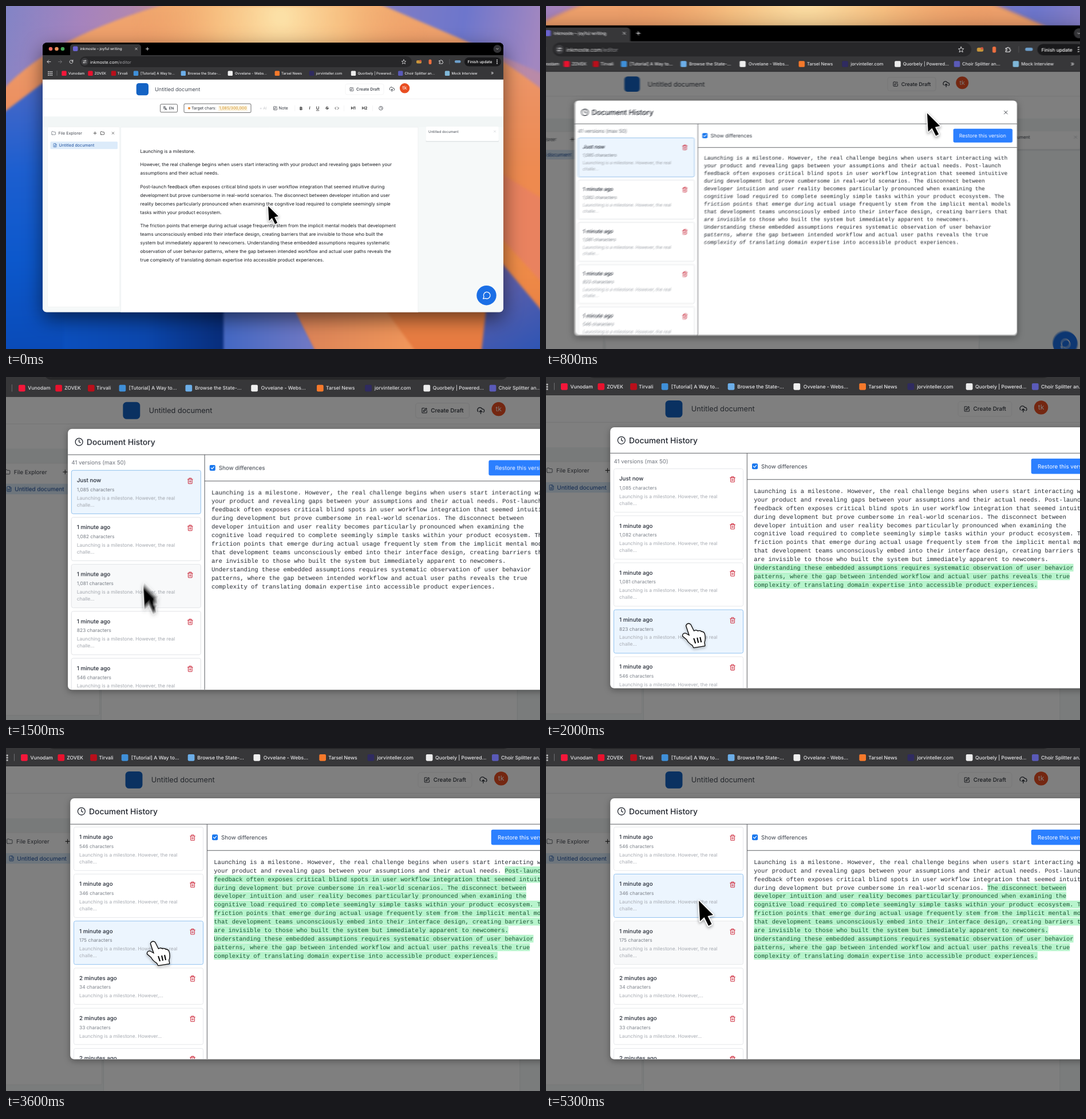
These frames come from a looping animation (933x600 px, 5400 ms). An HTML page with a canvas:

```html
<!DOCTYPE html>
<html lang="en">
<head>
<meta charset="utf-8">
<title>Document history</title>
<style>
html, body { margin: 0; width: 100%; height: 100%; overflow: hidden; background: #000 }
canvas { display: block; width: 933px; height: 600px }
</style>
</head>
<body>
<canvas id="stage" width="933" height="600"></canvas>
<script>
const W = 933, H = 600, LOOP = 5400, STEP = 100, ZOOM = 1.4;
const newCanvas = () => Object.assign(document.createElement('canvas'), { width: W, height: H });
const out = document.getElementById('stage').getContext('2d');
const layer = newCanvas(), wallpaper = newCanvas();
let c = layer.getContext('2d');

const PARAGRAPHS = [
  'Launching is a milestone.',
  'However, the real challenge begins when users start interacting with your product and revealing gaps between your\nassumptions and their actual needs.',
  'Post-launch feedback often exposes critical blind spots in user workflow integration that seemed intuitive during\ndevelopment but prove cumbersome in real-world scenarios. The disconnect between developer intuition and user\nreality becomes particularly pronounced when examining the cognitive load required to complete seemingly simple\ntasks within your product ecosystem.',
  'The friction points that emerge during actual usage frequently stem from the implicit mental models that development\nteams unconsciously embed into their interface design, creating barriers that are invisible to those who built the\nsystem but immediately apparent to newcomers. Understanding these embedded assumptions requires systematic\nobservation of user behavior patterns, where the gap between intended workflow and actual user paths reveals the\ntrue complexity of translating domain expertise into accessible product experiences.'
];
const FULL = PARAGRAPHS.join(' ').replace(/\n/g, ' ');
const MONO_LINES = FULL.match(/.{1,95}(?: |$)/g);

const ICON = {
  clock: 'M12 6v6l4 2M22 12a10 10 0 1 1-20 0a10 10 0 1 1 20 0',
  file: 'M15 2H6a2 2 0 0 0-2 2v16a2 2 0 0 0 2 2h12a2 2 0 0 0 2-2V7zM14 2v6h6M8 13h8M8 17h8',
  folder: 'M4 20h16a2 2 0 0 0 2-2V8a2 2 0 0 0-2-2h-8l-2-3H4a2 2 0 0 0-2 2v13a2 2 0 0 0 2 2z',
  trash: 'M3 6h18M5 6v14a2 2 0 0 0 2 2h10a2 2 0 0 0 2-2V6M8 6V2h8v4M10 11v6M14 11v6',
  edit: 'M12 3H5a2 2 0 0 0-2 2v14a2 2 0 0 0 2 2h14a2 2 0 0 0 2-2v-7M18 3l3 3l-9 9l-4 1l1-4z',
  cloud: 'M4 15a7 7 0 1 1 12-7h2a5 5 0 0 1 2 9M12 12v9M8 16l4-4l4 4',
  cross: 'M5 5l14 14M19 5l-14 14',
  plus: 'M4 12h16M12 4v16',
  back: 'M21 12H3M11 4l-8 8l8 8',
  next: 'M3 12h18M13 4l8 8l-8 8',
  reload: 'M20 12a8 8 0 1 1-3-6l3 3M20 3v6h-6',
  star: 'M12 2l3 7l7 .5l-5.500 5l2 7.500l-6.500-4l-6.500 4l2-7.500l-5.500-5l7-.5z',
  puzzle: 'M4 7h5a3 3 0 1 1 6 0h4v5a3 3 0 1 1 0 6v3H4v-5a3 3 0 1 0 0-5z',
  bubble: 'M3 21l2-5a9 9 0 1 1 4 4z',
  down: 'M5 9l7 7l7-7',
  code: 'M8 6l-6 6l6 6M16 6l6 6l-6 6',
  tune: 'M3 7h8M19 7h2M15 4a3 3 0 1 1 0 6a3 3 0 1 1 0-6M13 17h8M3 17h2M8 14a3 3 0 1 1 0 6a3 3 0 1 1 0-6',
  translate: 'M2 5h12M8 2v3M12 5c-1 5-5 9-9 10M4 8c2 4 5 6 8 7M11 22l5-12l5 12M13 18h6',
  check: 'M4 12l6 6l10-12'
};
for (const k in ICON) ICON[k] = new Path2D(ICON[k]);
const ARROW = new Path2D('M0 0L2 36L9.500 29L17 44L22.500 41L15.500 27L25 25Z');
const HAND = new Path2D('M-4 2Q-2-3 3 0L9 12Q13 9 16 12Q20 10 22 13Q27 12 28 19Q29 27 27 31L28 37L9 40L7 36Q0 32-3 26L-10 20Q-10 15-5 16L2 20Z');
const FINGERS = new Path2D('M9 24l3 9M15 23l2 9M20 22l2 9');

// ---- drawing helpers ----
function box(x, y, w, h, fill, r = 0, stroke) {
  c.beginPath();
  c.roundRect(x, y, w, h, r);
  if (fill) { c.fillStyle = fill; c.fill(); }
  if (stroke) { c.strokeStyle = stroke; c.stroke(); }
}
function dot(x, y, r, fill) {
  c.beginPath();
  c.arc(x, y, r, 0, 7);
  c.fillStyle = fill;
  c.fill();
}
// y is the middle of the capitals
function text(str, x, y, size, fill, weight = 400, family = 'Inter, sans-serif') {
  c.font = `${weight} ${size}px ${family}`;
  c.fillStyle = fill;
  c.fillText(str, x, y + size * 0.36);
}
function centered(...args) {
  c.textAlign = 'center';
  text(...args);
  c.textAlign = 'left';
}
function icon(name, x, y, size, color, width = 2) {
  c.save();
  c.translate(x - size / 2, y - size / 2);
  c.scale(size / 24, size / 24);
  c.lineWidth = width;
  c.lineJoin = c.lineCap = 'round';
  c.strokeStyle = color;
  c.stroke(ICON[name]);
  c.restore();
}
function shape(path, fill) {
  c.fillStyle = fill;
  c.fill(new Path2D(path));
}
function ramp(x0, y0, x1, y1, ...colors) {
  const g = c.createLinearGradient(x0, y0, x1, y1);
  colors.forEach((col, i) => g.addColorStop(i / (colors.length - 1), col));
  return g;
}

// ---- timing ----
const clamp = x => Math.max(0, Math.min(1, x));
const smooth = x => (x = clamp(x), x * x * (3 - 2 * x));
function spring(ms) {
  const u = Math.max(0, ms) * 0.0105;
  return 1 - (1 + u) * Math.exp(-u);
}
function camera(t) {
  const zoom = spring(t - 590), pan = spring(t - 1005);
  return {
    s: 1 + (ZOOM - 1) * zoom,
    x: 466.5 + 35.5 * zoom - 90.1 * pan,
    y: 300 - 38 * zoom + 58 * pan
  };
}
const MOUSE = [[0, 458, 350], [100, 458, 350], [600, 648, 186], [800, 648, 186],
  [1100, 547, 233.5], [1500, 253, 365], [1900, 256, 415], [2200, 258, 415], [2650, 260, 377],
  [3100, 260, 377], [3500, 262.3, 348.6], [4600, 262.3, 348.6], [5000, 268, 286], [5300, 269.4, 296.5], [5500, 269.4, 296.5]];
function mouse(t) {
  t = Math.max(0, t);
  const i = Math.max(1, MOUSE.findIndex(k => k[0] > t)) - 1;
  const a = MOUSE[i], b = MOUSE[i + 1], dt = b[0] - a[0], u = (t - a[0]) / dt;
  const slope = (k, n) => {
    const p = MOUSE[k - 1], q = MOUSE[k], r = MOUSE[k + 1];
    if (!p || !r || (q[n] - p[n]) * (r[n] - q[n]) <= 0) return 0;
    return (r[n] - p[n]) / (r[0] - p[0]);
  };
  return [1, 2].map(n => a[n] + (b[n] - a[n]) * u * u * (3 - 2 * u)
    + dt * u * (1 - u) * ((1 - u) * slope(i, n) - u * slope(i + 1, n)));
}

// ---- scene ----
function paintWallpaper() {
  const keep = c;
  c = wallpaper.getContext('2d');
  box(0, 0, W, H, ramp(0, 0, 260, 60, '#8284c6', '#a583bd', '#b98aa8'));
  c.filter = 'blur(2px)';
  // warm dome with a bright crown
  shape('M-9 150Q80 50 300-9H650Q800 40 942 150V610H-9Z', ramp(0, 0, 0, H, '#f0a76f', '#ec9263', '#ee8a50', '#ef8c48', '#e77a41'));
  const glow = c.createRadialGradient(480, 20, 10, 480, 20, 260);
  glow.addColorStop(0, '#fce0a6');
  glow.addColorStop(0.4, 'rgba(248,196,132,.85)');
  glow.addColorStop(1, 'rgba(240,160,100,0)');
  shape('M220 0H720L760 130H200Z', glow);
  shape('M640-9H942V120Q800 60 640-9Z', ramp(670, 0, 933, 40, '#7f7cc4', '#6d76cc', '#a287c0'));
  // cool rays on the left
  shape('M-9 190L110 100V610H-9Z', ramp(0, 130, 30, 600, '#4a68c6', '#1d5fd0', '#0c58cc', '#0a4bb8'));
  shape('M100 500H385V610H100Z', ramp(100, 0, 385, 0, '#0b4fbd', '#0b47ad', '#082c79'));
  shape('M380 500H490L545 610H380Z', ramp(380, 0, 530, 0, '#4368c4', '#6f78c4'));
  shape('M490 500H640L720 610H545Z', ramp(500, 0, 700, 0, '#d98258', '#f0955a'));
  // rays on the right
  shape('M860 290L942 340V490L860 400Z', '#e9825f');
  shape('M850 430L942 540V610H830Z', ramp(850, 450, 933, 600, '#6a62a8', '#2f55b4'));
  c.filter = 'none';
  c.shadowColor = 'rgba(0,0,0,.55)';
  c.shadowBlur = 34;
  c.shadowOffsetY = 12;
  box(64, 64.3, 805, 471, '#000', 7);
  c = keep;
}

function browser() {
  const light = '#e8e8ea', bar = '#373739';
  box(64, 64, 805, 23, '#000');
  ['#ee6a5f', '#e9925c', '#45a557'].forEach((col, i) => dot(78 + i * 10.5, 75, 3.3, col));
  box(112, 67, 124, 24, bar, 5);
  box(117, 70.5, 8.5, 8.5, '#6a63cf', 2);
  text('inkmoste – joyful writing', 129.5, 75, 6.3, light, 500);
  icon('cross', 227.5, 75, 6, light, 3);
  icon('plus', 247, 75, 7.5, light, 3);
  dot(858.5, 75, 7, '#333336');
  icon('down', 858.5, 75, 6, light, 3);

  box(64, 86, 805, 42.5, bar);
  box(129, 88, 580, 19, '#272729', 9.5);
  icon('back', 75, 97.5, 8, light, 2.6);
  icon('next', 94.5, 97.5, 8, '#77777a', 2.6);
  icon('reload', 114, 97.5, 8.5, light, 2.6);
  dot(137.5, 97.5, 6.5, '#3d3d40');
  icon('tune', 137.5, 97.5, 7.5, light, 2.4);
  text('inkmoste.com', 147, 98, 7.4, '#f2f2f3');
  text('/editor', 147 + c.measureText('inkmoste.com').width, 98, 7.4, '#98989c');
  icon('star', 695, 97.5, 9, light);
  box(717, 95, 9, 5.5, '#c9973b', 2);
  dot(724, 96, 1.8, '#d45540');
  box(738.5, 93.5, 5, 8.5, '#ee7040', 2);
  icon('puzzle', 760, 97.5, 9, light, 2.4);
  box(774.5, 93, 0.8, 9, '#59595c');
  box(784, 95, 10.5, 4.5, '#6d9fcb', 2);
  box(801, 90, 64, 15.5, '#19191b', 7.75);
  text('Finish update', 806.5, 98, 6.7, '#fff', 500);
  [-3, 0, 3].forEach(d => dot(858, 97.5 + d, 0.9, '#fff'));

  for (let i = 0; i < 9; i++) box(73.2 + i % 3 * 3, 114 + (i / 3 | 0) * 3, 2, 2, '#bebec0', 0.4);
  box(88.7, 113, 0.7, 9, '#727275');
  [['Vunodam', 101.5, 109, '#f5173a'], ['ZOVEK', 147.5, 154.6, '#e8122e'], ['Tirvali', 188, 194.5, '#b90f1b'],
   ['[Tutorial] A Way to...', 227, 235, '#3f8fd8'], ['Browse the State-...', 309.8, 317.5, '#6caee8'],
   ['Ovvelane - Webs...', 391.8, 400, '#f0f0f0'], ['Tarsel News', 473.8, 481, '#f5792b'],
   ['jorvinteller.com', 534, 541.7, '#2f2b60'], ['Quorbely | Powered...', 607, 614.4, '#ececec'],
   ['Choir Splitter an...', 689.3, 696.5, '#5a5ab8'], ['Mock Interview', 771, 778.5, '#7fb7d8']
  ].forEach(([name, ix, tx, color]) => {
    box(ix - 4.2, 113.5, 8.4, 8.4, color, 1.5);
    text(name, tx, 117.5, 6.15, light, 500);
  });
  text('»', 847, 117, 9, light);
}

function page() {
  const ink = '#30353d';
  box(64, 128.3, 805, 408, '#fff');
  box(64, 193.5, 805, 342, '#f6f9f9');
  box(64, 193.5, 805, 18, '#f2f6f6');
  box(64, 162, 805, 0.8, '#ececee');

  box(227.7, 135, 21.3, 21.3, '#1463c4', 4.5);
  text('Untitled document', 260, 145.5, 9.1, '#484e58');
  c.lineWidth = 0.7;
  box(593, 136.3, 67, 18.7, '#fff', 3, '#f0f0f1');
  icon('edit', 604, 145.6, 8, ink, 2.2);
  text('Create Draft', 612, 145.6, 7.05, ink, 500);
  icon('cloud', 674.3, 145.5, 10.5, ink, 2.2);
  dot(696.6, 143.8, 8.7, '#e94e22');
  centered('tk', 696.6, 143.3, 8.6, '#fff');

  box(269.5, 171.8, 30, 14, '#fff', 2, '#333');
  icon('translate', 278, 178.8, 7.5, ink, 2.4);
  text('EN', 284.8, 179, 6.3, ink, 500);
  box(311, 171, 117, 15.5, '#fff', 2, '#333');
  dot(320, 178.8, 2.1, '#ef8c2e');
  text('Target chars:', 324, 178.8, 7, ink);
  box(371, 174, 51, 10, '#fdf5e2');
  text('1,085/300,000', 372.5, 178.8, 7, '#d2952c');
  text('+ AI', 443, 179, 6.5, '#c2c4c8');
  icon('edit', 470.5, 178.8, 8, ink, 2.2);
  text('Note', 476.5, 178.8, 7.2, ink);
  [504.5, 590, 640].forEach(x => box(x, 174, 0.6, 10, '#ececee'));
  centered('B', 515.5, 178.8, 7.6, '#111', 700);
  centered('I', 530.5, 178.8, 7.4, '#111', 'italic 500');
  centered('U', 544.5, 178.3, 7.4, '#111', 500);
  box(541.8, 182.6, 5.5, 0.7, '#111');
  centered('S', 561, 178.8, 7.2, '#111', 500);
  box(557.8, 178.6, 6.4, 0.7, '#111');
  icon('code', 578, 178.8, 8, '#222', 2.4);
  centered('H1', 606.5, 178.8, 7, '#111', 600);
  centered('H2', 626.5, 178.8, 7, '#111', 600);
  icon('clock', 655, 178.8, 8, ink, 2.2);

  box(72.5, 211.5, 126, 315, '#fff', 2, '#eef0f0');
  icon('folder', 83.2, 222.4, 8, '#555b64');
  text('File Explorer', 91.5, 222.4, 7.05, '#40454e');
  icon('plus', 155.5, 222.4, 7.5, '#333', 2.4);
  icon('folder', 168.5, 222.4, 7.5, '#333', 2.4);
  icon('cross', 187, 222.4, 6.5, '#333', 2.4);
  box(77.5, 237.2, 117.5, 13, '#dcebfa', 1.5);
  icon('file', 85.5, 243.7, 7.5, '#2c62ad');
  text('Untitled document', 92.5, 243.7, 7.1, '#1e4f9d');

  box(200.5, 212, 519.5, 324, '#fff', 0, '#e9edee');
  let y = 254;
  for (const p of PARAGRAPHS) {
    for (const line of p.split('\n')) { text(line, 234.5, y, 8.05, '#1d1f24'); y += 15; }
    y += 8.5;
  }

  box(733.5, 235, 127.5, 3, '#e6eaeb', 1);
  box(734, 211, 126.5, 25, '#fff', 1.5);
  text('Untitled document', 738, 219.4, 6.05, '#454b54');
  icon('cross', 854, 219.4, 5.5, '#b7bbc0');
  dot(839.5, 506.2, 17.2, '#1b6fe6');
  icon('bubble', 839.5, 506.2, 15.5, '#fff', 2);
}

const VERSIONS = ['1,085', '1,082', '1,081', '823', '546', '346', '175', '34', '33', '32'];
function versionList(t) {
  const selected = t < 1900 ? 0 : t < 3600 ? 3 : t < 4900 ? 6 : 5;
  const hovered = t >= 1050 && t < 1700 ? 2 : t >= 5150 ? 6 : -1;
  const scroll = 351 * smooth((t - 2200) / 400);
  c.save();
  c.beginPath();
  c.rect(112, 134, 239, 410);
  c.clip();
  text('41 versions (max 50)', 118.5, 147 - scroll, 9.7, '#70757e');
  let y = 160.5 - scroll;
  VERSIONS.forEach((count, i) => {
    const short = i > 6, on = i === selected;
    c.lineWidth = 1;
    box(118.5, y, 226, short ? 63.5 : 76, on ? '#ecf5fe' : i === hovered ? '#f8f9fa' : '#fff', 3, on ? '#93c3f0' : '#e6e8eb');
    text(i === 0 ? 'Just now' : short ? '2 minutes ago' : '1 minute ago', 128, y + 17.3, 9.75, '#272d38', 500);
    text(count + ' characters', 128, y + 33.5, 8.4, '#7b8089');
    text('Launching is a milestone. However' + (i === 7 ? ',...' : short ? '...' : ', the real'), 128, y + 48.3, 8.4, '#a7abb2');
    if (!short) text('challe...', 128, y + 60.3, 8.4, '#a7abb2');
    icon('trash', 326, y + 18.5, 11.5, '#cf3344', 2.2);
    y += short ? 70.3 : 82.2;
  });
  if (t >= 2200 && t < 3100) box(344, 136 + scroll * 0.134, 5, 53, '#858585', 2.5);
  c.restore();
}

function diffText(t) {
  const first = t < 1900 ? '' : t < 3600 ? 'Understanding' : t < 4900 ? 'Post-launch' : 'The disconnect';
  const start = first ? FULL.indexOf(first) : FULL.length;
  const size = 10.46, family = '"Liberation Mono", monospace';
  let offset = 0;
  MONO_LINES.forEach((raw, i) => {
    const line = raw.trimEnd(), y = 199 + i * 14.93;
    const cut = Math.max(0, Math.min(line.length, start - offset));
    const plain = line.slice(0, cut), added = line.slice(cut);
    text(plain, 363.3, y, size, '#262b33', 400, family);
    const x = 363.3 + c.measureText(plain).width;
    if (added) {
      box(x, y - 6.7, c.measureText(added).width, 13.6, '#b7f4cc');
      text(added, x, y, size, '#1c5534', 400, family);
    }
    offset += raw.length;
  });
}

function modal(t) {
  box(64, 128.3, 805, 408, 'rgba(0,0,0,.5)');
  c.save();
  c.scale(1 / ZOOM, 1 / ZOOM);
  c.translate(110.2, 148);
  c.shadowColor = 'rgba(0,0,0,.35)';
  c.shadowBlur = 12;
  c.shadowOffsetY = 3;
  box(112.2, 88, 859.3, 456.5, '#fff', 7);
  c.shadowColor = 'transparent';
  icon('clock', 131.8, 110.8, 15.5, '#20252e', 2);
  text('Document History', 145, 110.8, 13.9, '#20252e', 500);
  icon('cross', 949.7, 111, 10.5, '#30353d', 2.4);
  versionList(t);
  box(112.2, 132.7, 859.3, 1, '#5d5f63');
  box(350.8, 133, 1, 411, '#5d5f63');
  box(351, 178.7, 620.5, 1, '#5d5f63');
  box(360, 151.2, 10, 10, '#1877ee', 2);
  icon('check', 365, 156.2, 7.5, '#fff', 4);
  text('Show differences', 376, 156.2, 9.8, '#3a404a');
  box(847.7, 142.7, 115, 26.8, '#2b7fff', 3);
  text('Restore this version', 859, 156.2, 9.8, '#fff');
  diffText(t);
  c.restore();
}

const between = (t, a, b) => t >= a && t < b;
function pointer(t, at) {
  const hand = between(t, 1800, 2200) || between(t, 3400, 4600) || between(t, 4900, 5150);
  const outline = hand ? HAND : ARROW;
  c.save();
  c.translate(...at);
  c.scale(1 / ZOOM, 1 / ZOOM);
  c.lineJoin = 'round';
  c.shadowColor = 'rgba(0,0,0,.4)';
  c.shadowBlur = 5;
  c.shadowOffsetY = 2;
  c.lineWidth = hand ? 2.6 : 3.6;
  c.strokeStyle = hand ? '#000' : '#fff';
  c.fillStyle = hand ? '#fff' : '#000';
  c.stroke(outline);
  c.shadowColor = 'transparent';
  c.fill(outline);
  if (hand) { c.lineWidth = 2; c.stroke(FINGERS); }
  c.restore();
}

function scene(t, cam, at) {
  c.setTransform(cam.s, 0, 0, cam.s, W / 2 - cam.x * cam.s, H / 2 - cam.y * cam.s);
  c.textRendering = 'geometricPrecision';
  c.drawImage(wallpaper, 0, 0);
  c.save();
  c.beginPath();
  c.roundRect(64, 64.3, 805, 471.2, 7);
  c.clip();
  page();
  browser();
  if (t >= 700) modal(t);
  c.restore();
  pointer(t, at);
}

// Motion blur: average several moments around t
function render(t) {
  const [x0, y0] = mouse(t - 20), [x1, y1] = mouse(t + 20);
  const moving = between(t, 590, 1800) || Math.hypot(x1 - x0, y1 - y0) > 1;
  const n = moving ? 10 : 1;
  for (let i = 0; i < n; i++) {
    const u = (i + 0.5) / n - 0.5;
    scene(t, camera(t + 11 * u), mouse(t + 40 * u));
    out.globalAlpha = 1 / (i + 1);
    out.drawImage(layer, 0, 0);
  }
}

paintWallpaper();
const begin = performance.now();
let shown = -1;
function tick() {
  const t = Math.floor((performance.now() - begin) % LOOP / STEP) * STEP;
  if (t !== shown) render(shown = t);
  requestAnimationFrame(tick);
}
tick();
</script>
</body>
</html>
```
